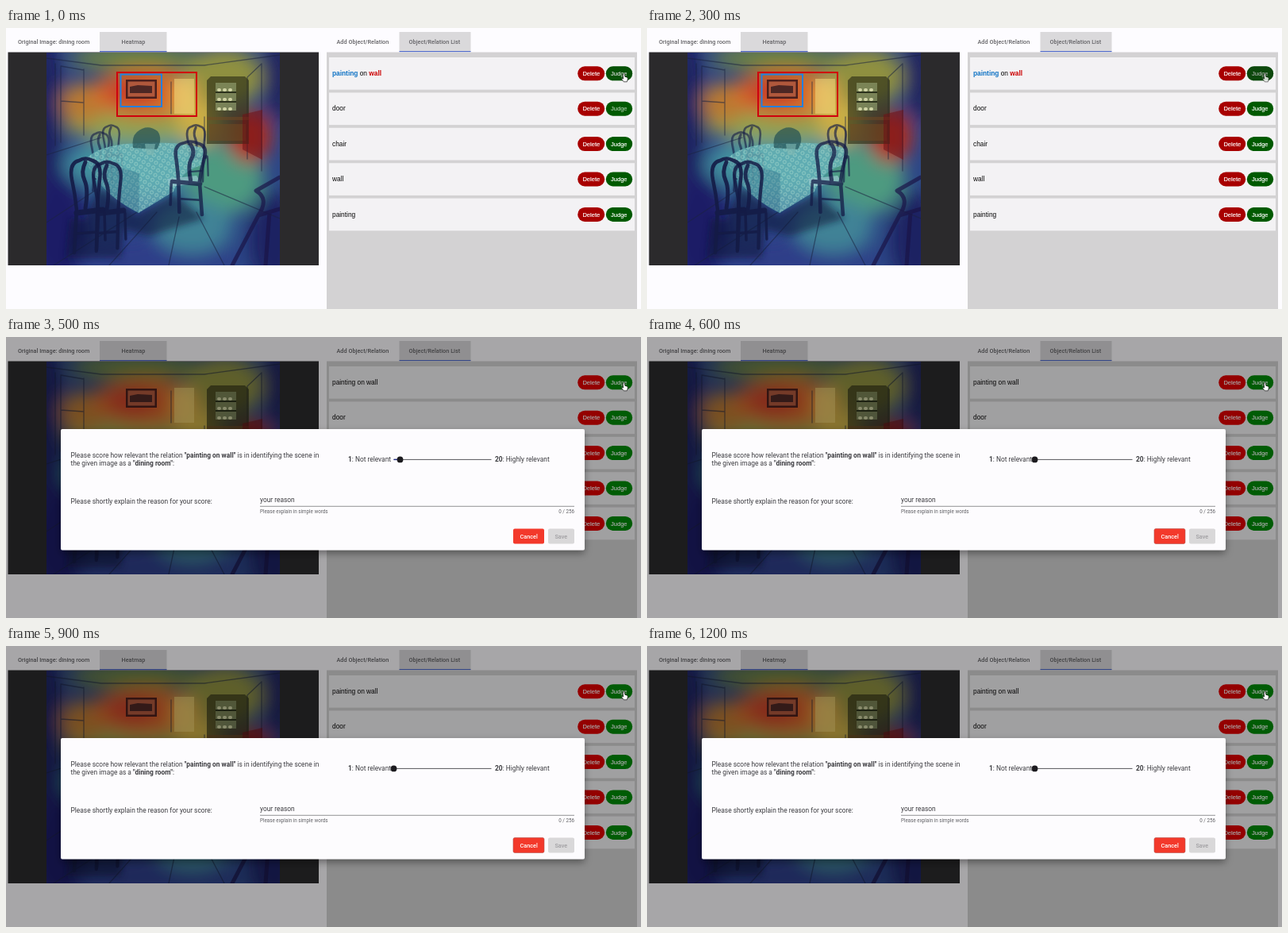
An HTML page that plays this animation: 800 by 354 pixels, repeating every 1300 ms.

```html
<!DOCTYPE html>
<html lang="en">
<head>
<meta charset="utf-8">
<title>Relevance judgement</title>
<style>
html, body { margin: 0; width: 100%; height: 100%; overflow: hidden; background: #fdfcff; }
svg { display: block; width: 800px; height: 354px; }
text { font: 8.38px Roboto, sans-serif; fill: #3c3c40; white-space: pre; }
.tab { font-size: 7.3px; font-weight: 500; fill: #656468; }
.row { font: 8.34px "Liberation Sans", Arial, sans-serif; fill: #080808; }
.btn { font-size: 7.3px; font-weight: 500; fill: #fff; text-anchor: middle; }
.pill { font: 7.5px "Liberation Sans", Arial, sans-serif; stroke: #fff; stroke-width: .18px; }
.hint { font-size: 6.28px; fill: #626266; }
.b { font-weight: 600; }
.del { fill: #a80000; }
.judge { fill: #005a00; }
.subject { fill: #0d72c4; font-weight: bold; }
.object { fill: #cc0000; font-weight: bold; }
.open .subject, .open .object { fill: #080808; font-weight: normal; }
.open .del { fill: #e00000; }
.open .judge { fill: #008c08; }
.open #boxes { display: none; }
.line { fill: none; stroke-linecap: round; stroke-linejoin: round; }
</style>
</head>
<body>
<svg id="stage" viewBox="0 0 800 354">
  <defs>
    <clipPath id="frame"><path d="M51 31H345V299H51Z"/></clipPath>
    <filter id="soft" x="-60%" y="-60%" width="220%" height="220%"><feGaussianBlur stdDeviation="11"/></filter>
    <filter id="dim" x="-40%" y="-40%" width="180%" height="180%"><feGaussianBlur stdDeviation="4"/></filter>
    <filter id="shade" x="-10%" y="-20%" width="120%" height="150%">
      <feDropShadow dx="0" dy="4" stdDeviation="5" flood-opacity=".38"/>
    </filter>
    <pattern id="lace" width="7" height="7" patternUnits="userSpaceOnUse" patternTransform="rotate(30)">
      <circle cx="3.500" cy="3.500" r="2" fill="none" stroke="#c9efd9"/>
    </pattern>
    <g id="chair" class="line" stroke="#141b46">
      <path stroke-width="4.500" d="M7 62Q5 42 1 24Q-3 3 10 0Q18-5 27 0Q39 3 36 24Q34 42 33 62L32 112M7 62L4 116"/>
      <path stroke-width="5" d="M18 2Q12 14 17 25T18 60"/>
      <path stroke-width="7" d="M7 66L40 62"/>
      <path stroke-width="3.500" d="M42 65L43 100M7 92L32 90"/>
    </g>
  </defs>

  <rect width="800" height="354" fill="#fdfcff"/>
  <path d="M118 5H202.500V30H118ZM495.500 5H585.500V30H495.500Z" fill="#dad9db"/>
  <path d="M118 29.700H202.500M495.500 29.700H585.500" stroke="#2f50c8"/>
  <text class="tab" x="15" y="20.300">Original Image: dining room</text>
  <text class="tab" x="145.500" y="20.300">Heatmap</text>
  <text class="tab" x="416.500" y="20.300">Add Object/Relation</text>
  <text class="tab" x="507.500" y="20.300">Object/Relation List</text>

  <path d="M2.500 30.500H394V299H2.500Z" fill="#2b2a2c"/>
  <g clip-path="url(#frame)">
    <path d="M51 31H345V299H51Z" fill="#2c4686"/>
    <g id="heat" filter="url(#soft)"></g>

    <!-- Room: walls, doors and floorboards -->
    <g class="line" stroke="#1b2340" opacity=".55" stroke-width="1.300">
      <path d="M62 45V148M69 48V144M98 52V135M69 48L98 53M69 92L98 94M51 38L120 47H250L345 34"/>
      <path d="M51 160L120 138M250 112V142M208 68V108M322 45V180M304 62V165M304 62L322 45"/>
      <path d="M51 245L112 205M60 299L165 232M130 299L190 232M205 299L218 238M275 299L240 232M345 240L250 200"/>
    </g>
    <path d="M212 64H237V108H212Z" fill="#f0d77c" opacity=".55"/>
    <path d="M253 66L258 61H301L306 66V146H253Z" fill="#2e3018" opacity=".65"/>
    <path d="M264 69H290V104H264Z" fill="#93a070" opacity=".65"/>
    <path d="M264 81H290M264 93H290" stroke="#2c321c" stroke-width="2"/>
    <path class="line" d="M268 78H286M268 90H286M268 102H286" stroke="#d0d3a4" stroke-width="4" stroke-dasharray="1 6"/>
    <path d="M253 112H306V116H253ZM256 121H302V142H256Z" fill="#754b22" opacity=".5"/>
    <path d="M298 109L323 103V166L298 153Z" fill="#6f1117" opacity=".55"/>

    <path d="M151 65H190V89H151Z" fill="#4b1f1c"/>
    <path d="M153.500 67.500H187.500V86.500H153.500Z" fill="#b0583c"/>
    <path d="M156 74L166 72L184 73V82H156Z" fill="#4d2724"/>

    <!-- Furniture -->
    <g filter="url(#dim)" fill="#0c1238" opacity=".55">
      <path d="M118 200L165 236L212 210L250 240L180 262L100 240Z"/>
      <path d="M80 240L150 245L145 290H75Z"/>
    </g>
    <use href="#chair" transform="translate(107 133) scale(.62)" opacity=".6"/>
    <use href="#chair" transform="translate(122 124) scale(.57)" opacity=".6"/>
    <use href="#chair" transform="translate(228 124) scale(.62)" opacity=".65"/>
    <path d="M99 168Q109 151 150 146Q215 141 250 152L246 173Q220 180 211 206L167 233Q137 218 118 196Z" fill="#69b4b8" opacity=".75"/>
    <path d="M99 168Q109 151 150 146Q215 141 250 152L246 173Q220 180 211 206L167 233Q137 218 118 196Z" fill="url(#lace)" opacity=".5"/>
    <path d="M99 168Q130 170 168 183L167 233Q137 218 118 196Z" fill="#235a7c" opacity=".3"/>
    <path d="M160 151Q158 137 165 131Q178 120 191 130Q198 140 190 153Z" fill="#1d4a50" opacity=".65"/>
    <path d="M175 146H188L186 160H177Z" fill="#7fb8b2" opacity=".6"/>
    <path d="M203 190L240 186L246 195L206 200Z" fill="#9ccbd1" opacity=".7"/>
    <use href="#chair" transform="translate(251 145) scale(-1.020 .78)" opacity=".75"/>
    <use href="#chair" transform="translate(82 167)" opacity=".9"/>
    <use href="#chair" transform="translate(110 171) scale(.95)" opacity=".85"/>
    <path class="line" d="M345 188L315 205Q332 215 318 236L285 299M318 236L345 228M332 232L327 299" stroke="#1a1448" stroke-width="5" opacity=".7"/>
  </g>
  <g id="boxes" fill="none" stroke-width="2">
    <path d="M140 56H240V111H140Z" stroke="#d0000d"/>
    <path d="M144.500 58.500H196V99H144.500Z" stroke="#2380df"/>
  </g>

  <path d="M404 30.500H795V354H404Z" fill="#d3d2d3"/>
  <g id="rows"></g>

  <rect id="veil" width="800" height="354"/>

  <g id="dialog">
    <rect x="69" y="116" width="660" height="152.500" rx="2" fill="#fdfcfe" filter="url(#shade)"/>
    <text x="81.500" y="152">Please score how relevant the relation <tspan class="b">"painting on wall"</tspan> is in identifying the scene in</text>
    <text x="81.500" y="162.300">the given image as a <tspan class="b">"dining room"</tspan>:</text>
    <text x="431" y="157"><tspan class="b">1</tspan>: Not relevant</text>
    <text x="616" y="157"><tspan class="b">20</tspan>: Highly relevant</text>
    <path d="M488.500 154.400H611.500" stroke="#55555a"/>
    <path id="fill" stroke="#202a86" stroke-width="1.400"/>
    <circle id="thumb" cy="154.400" r="3.900"/>
    <text x="81.500" y="210">Please shortly explain the reason for your score:</text>
    <text x="320" y="208">your reason</text>
    <path d="M320 213.300H716" stroke="#77777b" stroke-width=".8"/>
    <text class="hint" x="320" y="222">Please explain in simple words</text>
    <text class="hint" x="716" y="222" text-anchor="end">0 / 256</text>
    <rect id="cancel" x="639" y="241.500" width="39" height="19" rx="2" stroke-width=".6"/>
    <text class="btn" x="658.700" y="253.600">Cancel</text>
    <rect x="683" y="241.500" width="33" height="19" rx="2" fill="#d9d8d9"/>
    <text class="btn" x="699.300" y="253.600" style="fill:#a09fa2">Save</text>
  </g>

  <path id="cursor" d="M777.300 58.500Q778.300 57 779.300 58.600L779.800 61.300L782.600 62.200Q783.600 62.700 783.300 64.500L782.300 67.800H778.300L775.500 64.300Q775.700 63 777.600 64Z" fill="#fff" stroke="#151515" stroke-width=".7"/>
</svg>
<script>
const $ = id => document.getElementById(id);
const set = (el, attrs) => { for (const k in attrs) el.setAttribute(k, attrs[k]); };

// Heat spots: x, y, radius x, radius y, colour
$('heat').innerHTML = [
  [51, 110, 22, 110, '#1f2060'], [345, 60, 22, 60, '#20255f'],
  [165, 38, 85, 16, '#6f8540'], [275, 62, 48, 38, '#8f9040'],
  [170, 172, 95, 38, '#43939f'], [275, 190, 50, 45, '#4d9a80'],
  [165, 122, 90, 20, '#93a04e'], [245, 120, 30, 28, '#c9ae45'],
  [97, 95, 28, 26, '#b97a30'], [175, 82, 68, 30, '#d46a2c'],
  [160, 80, 34, 20, '#c83f2b'], [226, 85, 14, 26, '#dfae48'],
  [307, 137, 28, 33, '#b02f22'], [65, 255, 40, 70, '#1d1f66'],
  [190, 290, 100, 26, '#2d3c88'], [235, 250, 50, 34, '#3f8296'],
  [338, 265, 32, 60, '#1f2062']
].map(([x, y, rx, ry, c]) => `<ellipse cx="${x}" cy="${y}" rx="${rx}" ry="${ry}" fill="${c}"/>`).join('');

const pill = (x, width) => `x="${x}" y="48.300" width="${width}" height="18" rx="9"`;
const relation = '<tspan class="subject">painting</tspan> on <tspan class="object">wall</tspan>';
$('rows').innerHTML = [relation, 'door', 'chair', 'wall', 'painting'].map((label, i) => `
  <g transform="translate(0 ${i * 44.4})">
    <rect x="407" y="37" width="385" height="40.700" fill="#f3f2f4"/>
    <text class="row" x="411" y="60">${label}</text>
    <rect class="del" ${pill(720.2, 34)}/>
    <text class="btn pill" x="737.300" y="60">Delete</text>
    <rect class="judge" ${pill(755.8, 33.4)}/>
    <text class="btn pill" id="judge${i}" x="772.300" y="60">Judge</text>
    <rect id="press${i}" ${pill(755.8, 33.4)} fill="#203020" opacity="0"/>
  </g>`).join('');

const start = performance.now();
function draw(now) {
  const step = Math.floor(Math.max(0, now - start) % 1300 / 100);
  const open = step >= 4, opening = step === 4;
  $('stage').classList.toggle('open', open);

  set($('press0'), { opacity: open ? 0 : Math.min(.42, .2 + step * .08) });
  set($('judge1'), { opacity: step === 0 ? .65 : 1 });
  set($('veil'), { opacity: open ? (opening ? .26 : .34) : 0 });

  const scale = opening ? .979 : 1;
  set($('dialog'), {
    opacity: open ? (opening ? .93 : 1) : 0,
    transform: `translate(399 192) scale(${scale}) translate(-399 -192)`
  });
  const x = opening ? 524 : step === 5 ? 496.5 : 488.5;
  set($('thumb'), { cx: x, fill: opening ? '#35141c' : '#1c1b1f' });
  set($('fill'), { d: `M488.500 154.400H${x}` });
  set($('cancel'), { fill: opening ? '#ec6458' : '#f3392b', stroke: step > 5 ? '#b8504a' : 'none' });
  set($('cursor'), { opacity: !open && step > 0 ? .8 : 1 });
  requestAnimationFrame(draw);
}
draw(start);
</script>
</body>
</html>
```
